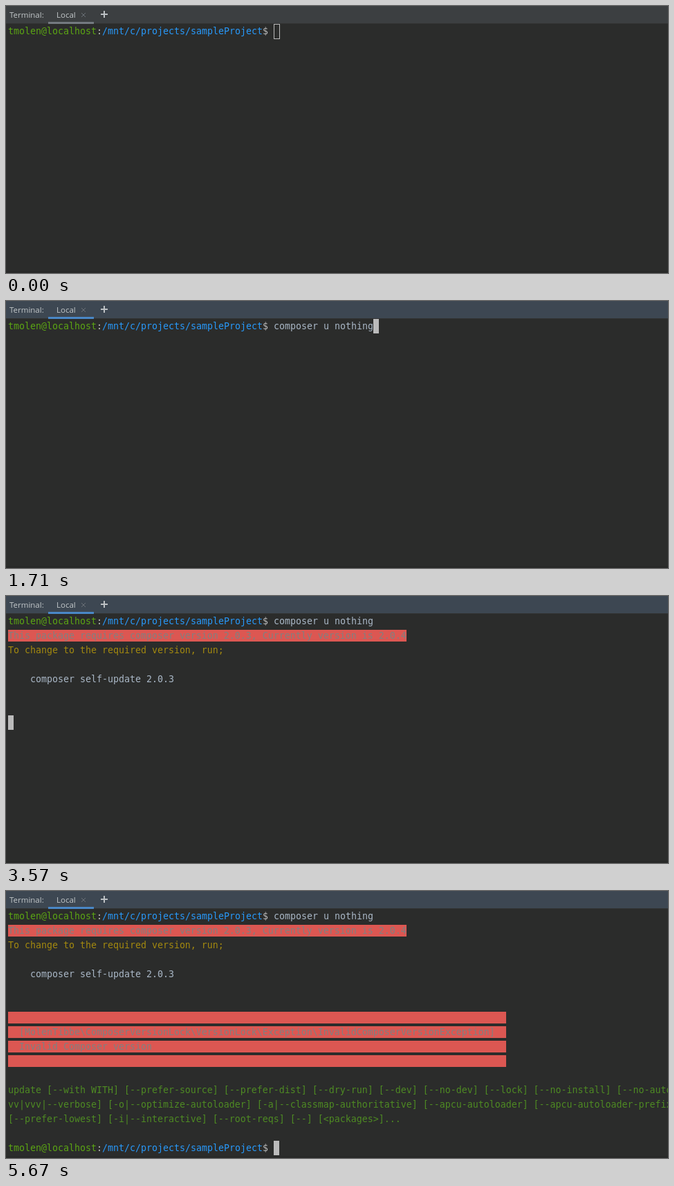
Animation of 957x387 px, one loop 5.97 s. Source, as an HTML page with a canvas:

```html
<!DOCTYPE html>
<html lang="en">
<head>
<meta charset="utf-8">
<title>Terminal</title>
<style>
  html, body { margin: 0; width: 100%; height: 100%; overflow: hidden; background: #2b2c2b; }
  canvas { display: block; }
</style>
</head>
<body>
<canvas id="stage" width="957" height="387"></canvas>
<script>
const ctx = document.getElementById('stage').getContext('2d');
const LOOP = 5970, LEFT = 3, TOP = 26, CELL = 8, LINE = 21;
const PROMPT_COLS = 48;
const COMMAND = 'composer u nothing';
const MONO = '13.29px "DejaVu Sans Mono", monospace';
const UI = '11.5px "Open Sans", sans-serif';
const color = {
  user: '#5ba414', path: '#2899fa', plain: '#a9b7c6', mark: '#bbbbbb',
  red: '#dc5752', onRed: '#808080', yellow: '#a3890f', green: '#4e8a23'
};

// Focus, text and cursor state from each moment on
const timeline = [
  { at: 0, cursor: [PROMPT_COLS, 0] },
  { at: 380, focus: true },
  { at: 460, hollow: false },
  { at: 1390, cursor: null },
  { at: 1710, typed: true, cursor: [PROMPT_COLS + COMMAND.length, 0] },
  { at: 2790, cursor: null },
  { at: 3250, cursor: [0, 1] },
  { at: 3570, warning: true, cursor: [0, 7] },
  { at: 3650, error: true, cursor: [PROMPT_COLS, 16] },
  { at: 4190, cursor: null },
  { at: 4650, cursor: [PROMPT_COLS, 16] },
  { at: 5190, cursor: null },
  { at: 5670, cursor: [PROMPT_COLS, 16] }
];

function rect(x, y, w, h, fill) {
  ctx.fillStyle = fill;
  ctx.fillRect(x, y, w, h);
}

function line(x1, y1, x2, y2) {
  ctx.beginPath();
  ctx.moveTo(x1, y1);
  ctx.lineTo(x2, y2);
  ctx.stroke();
}

function write(text, col, row, fill) {
  ctx.font = MONO;
  ctx.fillStyle = fill;
  ctx.fillText(text, LEFT + col * CELL, TOP + row * LINE + 15);
}

function redLine(text, row, cols) {
  rect(LEFT, TOP + row * LINE + 2, cols * CELL, 17, color.red);
  write(text, 0, row, color.onRed);
}

function drawPrompt(row) {
  write('tmolen@localhost', 0, row, color.user);
  write(':', 16, row, color.mark);
  write('/mnt/c/projects/sampleProject', 17, row, color.path);
  write('$', 46, row, color.mark);
}

function drawHeader(focus) {
  rect(0, 0, 957, 25, focus ? '#3d4752' : '#3c3f41');
  rect(0, 25, 957, 1, '#323232');
  rect(61, 23, 66, 3, focus ? '#4a88c7' : '#747a80');
  ctx.font = UI;
  ctx.fillStyle = '#c3c8ca';
  ctx.fillText('Terminal:', 5, 17);
  ctx.fillText('Local', 73, 17);
  ctx.strokeStyle = '#6b7177';
  ctx.lineWidth = 1;
  line(109, 10, 115, 16);
  line(115, 10, 109, 16);
  ctx.strokeStyle = '#bcc0c3';
  ctx.lineWidth = 2;
  line(137, 12, 147, 12);
  line(142, 7, 142, 17);
}

function drawWarning() {
  redLine('This package requires composer version 2.0.3, Currently version is 2.0.4', 1, 72);
  write('To change to the required version, run;', 0, 2, color.yellow);
  write('composer self-update 2.0.3', 4, 4, color.plain);
}

function drawError() {
  [
    '',
    '  [MolenTibbe\\ComposerVersionLock\\VersionLock\\Exception\\InvalidComposerVersionException]',
    '  Invalid Composer version',
    ''
  ].forEach((text, i) => redLine(text, 7 + i, 90));
  [
    'update [--with WITH] [--prefer-source] [--prefer-dist] [--dry-run] [--dev] [--no-dev] [--lock] [--no-install] [--no-autoloader]',
    'vv|vvv|--verbose] [-o|--optimize-autoloader] [-a|--classmap-authoritative] [--apcu-autoloader] [--apcu-autoloader-prefix',
    '[--prefer-lowest] [-i|--interactive] [--root-reqs] [--] [<packages>]...'
  ].forEach((text, i) => write(text, 0, 12 + i, color.green));
  drawPrompt(16);
}

function drawCursor([col, row], hollow) {
  const x = LEFT + col * CELL, y = TOP + row * LINE;
  if (!hollow) return rect(x, y, CELL, LINE, color.mark);
  ctx.strokeStyle = color.mark;
  ctx.lineWidth = 1;
  ctx.strokeRect(x + 0.5, y + 0.5, CELL, LINE);
}

function render(now) {
  const t = now % LOOP;
  const state = Object.assign({ hollow: true }, ...timeline.filter(step => step.at <= t));
  rect(0, 0, 957, 387, '#2b2c2b');
  rect(0, 384, 957, 3, '#282928');
  drawHeader(state.focus);
  drawPrompt(0);
  if (state.typed) write(COMMAND, PROMPT_COLS, 0, color.plain);
  if (state.warning) drawWarning();
  if (state.error) drawError();
  if (state.cursor) drawCursor(state.cursor, state.hollow);
}

function tick() {
  render(performance.now());
  requestAnimationFrame(tick);
}
tick();
</script>
</body>
</html>
```
